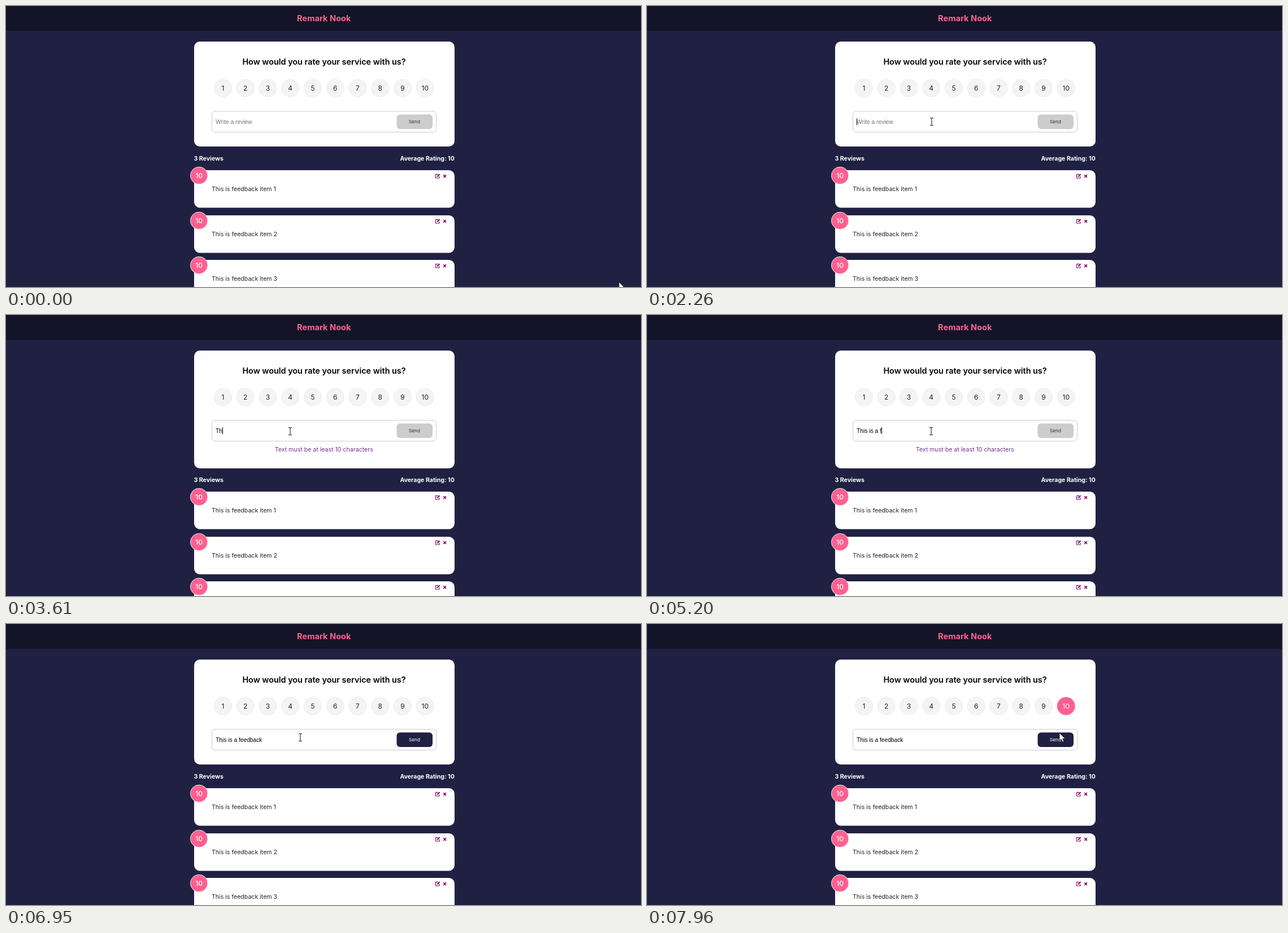
Animation of 1124 by 498 pixels, one loop 8 s. Source, as an HTML page:

```html
<!DOCTYPE html>
<html lang="en">
<head>
<meta charset="utf-8">
<title>Review form</title>
<style>
  html, body { margin: 0; width: 100%; height: 100%; overflow: hidden; background: #202142; }
  svg { display: block; font-family: Inter, Roboto, sans-serif; }
  .mid { text-anchor: middle; }
  .end { text-anchor: end; }
  .title { font-size: 14.6px; font-weight: 700; fill: #ff6090; }
  .question { font-size: 14.4px; font-weight: 600; fill: #000; }
  .score circle { fill: #f4f4f4; stroke: #eaeaea; stroke-width: .8; }
  .score text { font-size: 12px; fill: #222; }
  .score.on circle { fill: #ff6090; stroke: #ff6090; }
  .score.on text { fill: #fff; }
  .field { font: 10.24px "Liberation Sans", Arial, sans-serif; }
  .stats { font-size: 10.6px; font-weight: 700; fill: #fff; }
  .body { font-size: 10.6px; fill: #222; }
  .badge { font-size: 12px; font-weight: 500; fill: #fff; }
  .error { font-size: 10.6px; fill: #74308a; }
  .send { font-size: 8.2px; }
</style>
</head>
<body>
<svg id="stage" width="1124" height="498" viewBox="0 0 1124 498"></svg>
<script>
const LOOP = 8000;
const ERROR_SHIFT = 22;
const CARD_HEIGHT = 186;
const FIELD_X = 371;
const SCORE_Y = 145.5, SCORE_R = 15.7;
const scoreX = n => 384 + (n - 1) * 39.75;

const scores = Array.from({ length: 10 }, (_, i) => `
  <g class="score mid">
    <circle cx="${scoreX(i + 1)}" cy="${SCORE_Y}" r="${SCORE_R}"/>
    <text x="${scoreX(i + 1)}" y="149.8">${i + 1}</text>
  </g>`).join('');

const panel = (y, height, id = '') =>
  `<rect id="${id}" x="333" y="${y}" width="461" height="${height}" rx="10" fill="#fff"/>`;

const item = n => `
  <g transform="translate(0 ${Math.round(291.4 + (n - 1) * 79.4)})">
    ${panel(0, 66.5)}
    <circle cx="341.7" cy="9.5" r="15.3" fill="#ff6090" stroke="#eee"/>
    <text class="badge mid" x="341.7" y="13.9">10</text>
    <text class="body" x="364" y="37.2">This is feedback item ${n}</text>
    <g fill="none" stroke="#850c70" stroke-width="1.2">
      <path d="M765 7.4H760.6V14H767V11"/>
      <path d="M763.2 11.6L767.6 7" stroke-width="2.1"/>
      <path d="M774.4 8.2L779 12.8M779 8.2L774.4 12.8" stroke-width="1.7"/>
    </g>
  </g>`;

document.getElementById('stage').innerHTML = `
  <rect width="1124" height="498" fill="#202142"/>
  <rect width="1124" height="44" fill="#131428"/>
  <text class="title mid" x="562.8" y="27">Remark Nook</text>
  ${panel(63, CARD_HEIGHT, 'card')}
  <text class="question mid" x="563" y="104">How would you rate your service with us?</text>
  ${scores}
  <rect x="364.5" y="186.5" width="397" height="37" rx="5.5" fill="#fff" stroke="#ccc"/>
  <text id="entry" class="field" x="${FIELD_X}" y="208.6"></text>
  <rect id="caret" y="199" width="1" height="12"/>
  <rect id="button" x="691.5" y="192.3" width="63.6" height="25.6" rx="6"/>
  <text id="send" class="send mid" x="723" y="208.4">Send</text>
  <text id="error" class="error mid" x="562.8" y="242.4">Text must be at least 10 characters</text>
  <g id="lower">
    <text class="stats" x="332.4" y="273.6">3 Reviews</text>
    <text class="stats end" x="793.8" y="273.6">Average Rating: 10</text>
    ${[1, 2, 3].map(item).join('')}
  </g>
  <path id="arrow" d="M0 0V14L3.3 11.2L5.6 16.3L8 15.2L5.8 10.3H10Z"
    fill="#fff" stroke="#111" stroke-width=".9"/>
  <path id="beam" d="M-3-6.5H-1Q0-6.5 0-5.5Q0-6.5 1-6.5H3M0-5.5V5.5M-3 6.5H-1Q0 6.5 0 5.5Q0 6.5 1 6.5H3"
    fill="none" stroke="#111"/>`;

const [card, entry, caret, button, send, error, lower, arrow, beam] =
  ['card', 'entry', 'caret', 'button', 'send', 'error', 'lower', 'arrow', 'beam']
    .map(id => document.getElementById(id));
const scoreEls = [...document.querySelectorAll('.score')];

const ruler = document.createElement('canvas').getContext('2d');
ruler.font = '10.24px "Liberation Sans", Arial, sans-serif';

const FOCUS_TIME = 2260, PICK_TIME = 7750, BLINK = 530, MIN_LENGTH = 12;

// Each word is typed at an even pace
const WORDS = [
  { text: 'This ', start: 3470, end: 3870 },
  { text: 'is ', start: 4200, end: 4400 },
  { text: 'a ', start: 4660, end: 4730 },
  { text: 'feedback', start: 5200, end: 6000 }
];

// The pointer glides in jumps; power shapes the horizontal ease-out
const REST = { x: 1085, y: 489 };
const MOVES = [
  { start: 70, end: 330, steps: 5, x: 807, y: 235, power: 1 },
  { start: 790, end: 1400, steps: 10, x: 505, y: 204, power: 4 },
  { start: 2260, end: 2330, steps: 2, x: 503, y: 206, power: 1 },
  { start: 6950, end: 7750, steps: 13, x: 741, y: 147, power: 1 },
  { start: 7820, end: 7960, steps: 3, x: 730, y: 193, power: 1 }
];

// Evenly spaced steps done by time t, the first at start and the last at end
function stepsDone(t, { start, end }, count) {
  if (t < start) return 0;
  if (t >= end) return count;
  return 1 + Math.floor((t - start) / (end - start) * (count - 1));
}

function pointerAt(t) {
  return MOVES.reduce((from, move) => {
    const k = stepsDone(t, move, move.steps) / move.steps;
    const kx = 1 - (1 - k) ** move.power;
    return { x: from.x + (move.x - from.x) * kx, y: from.y + (move.y - from.y) * k };
  }, REST);
}

function typingAt(t) {
  let text = '', lastKey = FOCUS_TIME;
  for (const word of WORDS) {
    const count = stepsDone(t, word, word.text.length);
    if (!count) break;
    text += word.text.slice(0, count);
    lastKey = word.start + (word.end - word.start) * (count - 1) / (word.text.length - 1);
  }
  return { text, lastKey };
}

const show = (node, on) => node.setAttribute('visibility', on ? 'visible' : 'hidden');

function drawForm(t) {
  const { text, lastKey } = typingAt(t);
  const ready = text.length >= MIN_LENGTH;
  const tooShort = text.length > 1 && !ready;
  const shift = tooShort ? ERROR_SHIFT : 0;
  const focused = t >= FOCUS_TIME && t < PICK_TIME;

  entry.textContent = text || 'Write a review';
  entry.setAttribute('fill', text ? '#000' : '#757575');
  caret.setAttribute('x', Math.round(FIELD_X + ruler.measureText(text).width));
  show(caret, focused && Math.floor((t - lastKey) / BLINK) % 2 === 0);

  button.setAttribute('fill', ready ? '#202142' : '#ccc');
  send.setAttribute('fill', ready ? '#fff' : '#333');
  show(error, tooShort);
  card.setAttribute('height', CARD_HEIGHT + shift * 1.03);
  lower.setAttribute('transform', `translate(0 ${shift})`);
}

function drawPointer(t) {
  const { x, y } = pointerAt(t);
  const overField = x > 364 && x < 691 && y > 187 && y < 222;
  for (const pointer of [arrow, beam]) {
    pointer.setAttribute('transform', `translate(${Math.round(x)} ${Math.round(y)})`);
    show(pointer, (pointer === beam) === overField);
  }
  scoreEls.forEach((node, i) => {
    const hovered = Math.hypot(x - scoreX(i + 1), y - SCORE_Y) < SCORE_R;
    node.classList.toggle('on', hovered || (i === 9 && t >= PICK_TIME));
  });
}

const start = performance.now();
function tick() {
  const t = (performance.now() - start) % LOOP;
  drawForm(t);
  drawPointer(t);
  requestAnimationFrame(tick);
}
tick();
</script>
</body>
</html>
```
